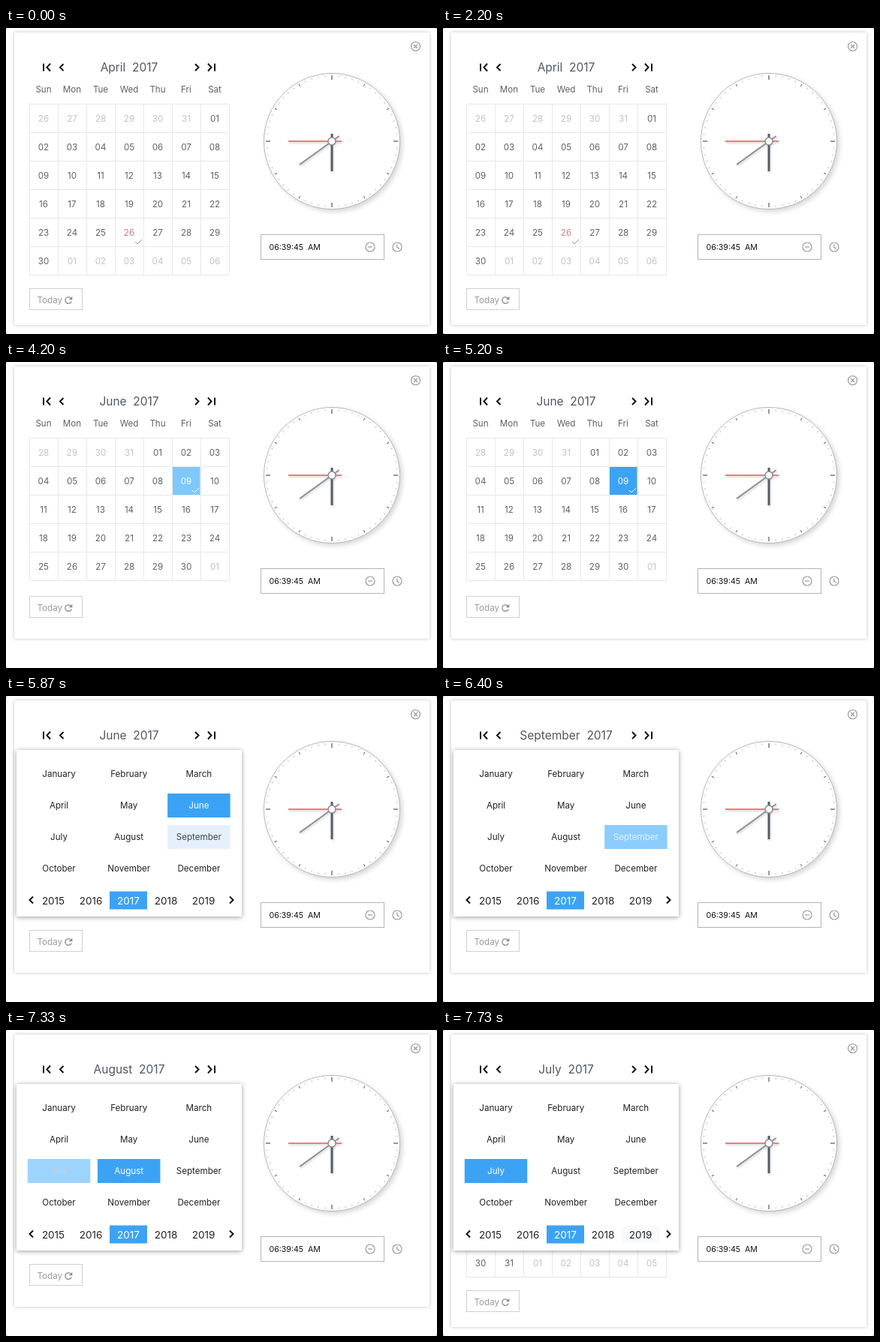
Write an HTML page that moves like this. It is 574 by 408 pixels and loops after 8000 ms.

```html
<!DOCTYPE html>
<html lang="en">
<head>
<meta charset="utf-8">
<title>Date and time picker</title>
<style>
html, body { margin: 0; width: 100%; height: 100%; overflow: hidden; background: #777; }
#stage { display: block; width: 574px; height: 408px; background: #fff; border-radius: 2px; }
text {
  font-family: Inter, "Open Sans", sans-serif; font-size: 11.6px; fill: currentColor;
  text-anchor: middle; dominant-baseline: central; white-space: pre;
}
.left { text-anchor: start; }
.icon { fill: none; stroke: #9a9a9a; stroke-width: 1.2; }
.nav { fill: none; stroke: #111; stroke-width: 2; }
.box { fill: #fff; stroke: #b4b4b4; }
.grid { fill: none; stroke: #e8e8e8; }
.tick { fill: none; stroke: #b98a8c; stroke-width: 1; }

#card { fill: #fff; height: 390px; filter: drop-shadow(0 0 2px rgba(0,0,0,.25)); }
#face { fill: #fff; stroke: #b5b5b5; filter: drop-shadow(3px 3px 3px rgba(0,0,0,.16)); }
#hands { filter: drop-shadow(1px 2px 1px rgba(0,0,0,.15)); }
#titles { color: #505860; }
#titles text { font-size: 15.5px; }
#weekdays { color: #606060; }
#today { color: #999; }
#pane { height: 229px; }
#popup { color: #222; transform-origin: 164px 72px; }
#sheet { fill: #fff; filter: drop-shadow(0 1px 3px rgba(0,0,0,.4)); }

.cell { fill: transparent; color: #5e6163; }
.out { color: #bfc2c4; }
.marked { color: #d4787c; }
.month, .year { fill: transparent; color: #222; }
.year text { font-size: 13.5px; }
.y2017 { fill: #3ca3f4; color: #fff; }

#card, #pane, #today, #track, #strip, #popup, #popup g, .hover, .pick, .check {
  animation: 8s ease-in-out infinite;
}
#card { animation-name: card; }
#pane { animation-name: pane; }
#today { animation-name: lift; }
#track { animation-name: track; }
#strip { animation-name: strip; animation-timing-function: step-end; }
#popup { animation-name: open; }
.hover { animation-name: pass; }
.pick { animation-name: pick; }
.check { animation-name: check; stroke: #fff; }
#popup .Jun { animation-name: june; }
#popup .Sep { animation-name: september; }
#popup .Aug { animation-name: august; }
#popup .Jul { animation-name: july; }
#popup .y2019 { animation-name: lastYear; }

@keyframes card {
  0%, 28.3%, 92.5%, 100% { height: 390px; }
  28.35%, 92.45% { height: 363px; }
}
@keyframes pane {
  0%, 28.3%, 92.5%, 100% { height: 229px; }
  28.35%, 92.45% { height: 191px; }
}
@keyframes lift {
  0%, 28.3%, 92.5%, 100% { transform: none; }
  28.35%, 92.45% { transform: translateY(-35px); }
}
@keyframes track {
  0%, 27.6% { transform: translateX(0); }
  31.3%, 35.6% { transform: translateX(-267px); }
  39%, 76.6% { transform: translateX(-534px); }
  76.7%, 87.5% { transform: translateX(-1335px); }
  87.6%, 92.5% { transform: translateX(-1068px); }
  95.7%, 100% { transform: translateX(-801px); }
}
@keyframes strip {
  0% { transform: translateY(0); }
  28.35% { transform: translateY(-24px); }
  36.6% { transform: translateY(-48px); }
  76.6% { transform: translateY(-120px); }
  87.5% { transform: translateY(-96px); }
  92.5%, 100% { transform: translateY(-72px); }
}
@keyframes open {
  0%, 68.3% { opacity: 0; transform: scaleY(.8); }
  71.2%, 100% { opacity: 1; transform: none; }
}
@keyframes pass {
  0%, 42.4%, 46.5%, 100% { fill: rgba(228,241,252,0); }
  43.5%, 44.8% { fill: rgb(228,241,252); }
}
@keyframes pick {
  0%, 44.8% { fill: rgba(228,241,252,0); color: #5e6163; }
  46.4%, 48.3% { fill: #e4f1fc; color: #5e6163; }
  50.8%, 56.5% { fill: #7dc8fc; color: #fff; }
  59%, 100% { fill: #3ca3f4; color: #fff; }
}
@keyframes check {
  0%, 48.3% { opacity: 0; }
  50%, 100% { opacity: 1; }
}
@keyframes june {
  0%, 76.5% { fill: #3ca3f4; color: #fff; }
  78.5%, 100% { fill: rgba(60,163,244,0); color: #222; }
}
@keyframes september {
  0%, 72% { fill: rgba(228,241,252,0); color: #222; }
  73.2%, 75.4% { fill: #e4f1fc; color: #444; }
  76.6%, 80% { fill: #8ccdfd; color: #e4f1fc; }
  81.5%, 87.4% { fill: #3ca3f4; color: #fff; }
  89.4%, 100% { fill: rgba(60,163,244,0); color: #222; }
}
@keyframes august {
  0%, 81.5% { fill: rgba(228,241,252,0); color: #222; }
  83%, 85.4% { fill: #e4f1fc; color: #444; }
  86.5%, 88.4% { fill: #8ccdfd; color: #cfe8fb; }
  89.6%, 92.4% { fill: #3ca3f4; color: #fff; }
  94.4%, 100% { fill: rgba(60,163,244,0); color: #222; }
}
@keyframes july {
  0%, 88.4% { fill: rgba(228,241,252,0); color: #222; }
  89.6%, 90.8% { fill: #e4f1fc; color: #444; }
  92%, 93.5% { fill: #8ccdfd; color: #e4f1fc; }
  95.5%, 100% { fill: #3ca3f4; color: #fff; }
}
@keyframes lastYear {
  0%, 95.7% { fill: rgba(248,250,253,0); }
  96.6%, 100% { fill: #f8fafd; }
}
</style>
</head>
<body>
<svg id="stage" viewBox="0 0 574 408">
  <rect id="card" x="11" y="6" width="553"/>

  <g class="icon">
    <circle cx="545.5" cy="24.5" r="6"/>
    <path d="M543 22l5 5m0-5l-5 5"/>
  </g>

  <path class="nav" d="M50 47.5v10M59 47.5l-4.5 5 4.5 5M76.5 48l-4.5 4.5 4.5 4.5M252 48l4.5 4.5-4.5 4.5M269 47.5l4.5 5-4.5 5M278 47.5v10"/>
  <svg id="titles" x="84" y="40" width="160" height="24"><g id="strip"></g></svg>
  <g id="weekdays"></g>
  <svg id="pane" x="31" y="101" width="267"><g id="track"></g></svg>

  <g id="today">
    <rect class="box" x="31.5" y="347.5" width="70" height="28" style="stroke:#d0d0d0"/>
    <text class="left" x="41.5" y="363">Today</text>
    <path class="icon" style="stroke-width:1.5" d="M86.4 360.2A4.3 4.3 0 1 0 87.2 364.4"/>
    <path fill="#8a8a8a" d="M88.3 357.7v4.6h-4.6z"/>
  </g>

  <g transform="translate(434 151)">
    <circle id="face" r="90.5"/>
    <g id="ticks"></g>
    <g id="hands" fill="none">
      <path d="M0-10V40" stroke="#555c63" stroke-width="3"/>
      <path d="M-58 0H13" stroke="#ee7b80" stroke-width="2"/>
      <path d="M0-12V53" stroke="#8c9196" stroke-width="2" transform="rotate(54)"/>
      <circle r="5" fill="#fff" stroke="#8c8c8c" stroke-width="1.5"/>
    </g>
  </g>

  <rect class="box" x="339.5" y="275.5" width="164" height="33"/>
  <text class="left" x="350.5" y="292.5" style="font-size:10.6px;color:#111">06:39:45  AM</text>
  <g class="icon">
    <circle cx="485" cy="292" r="6"/>
    <path d="M482 292h6"/>
    <circle cx="521" cy="292" r="6"/>
    <path d="M520.8 288.5v4l3 1.6"/>
  </g>

  <g id="popup">
    <rect id="sheet" x="14" y="72" width="300" height="222"/>
    <path class="nav" d="M36 267.5l-4.5 4.5 4.5 4.5M298 267.5l4.5 4.5-4.5 4.5"/>
  </g>
</svg>
<script>
const names = ['January', 'February', 'March', 'April', 'May', 'June', 'July',
  'August', 'September', 'October', 'November', 'December'];
const APRIL = 3, SEPTEMBER = 8, SIZE = 38;

const add = (id, markup) => document.getElementById(id).insertAdjacentHTML('beforeend', markup);
const label = (x, y, s) => `<text x="${x}" y="${y}">${s}</text>`;
const button = (cls, cx, cy, w, h, s) =>
  `<g class="${cls}"><rect x="${cx - w / 2}" y="${cy - h / 2}" width="${w}" height="${h}"/>${label(cx, cy, s)}</g>`;

function dayClass(date, month) {
  if (date.getMonth() !== month) return 'cell out';
  const key = `${month + 1}/${date.getDate()}`;
  return 'cell ' + ({ '4/26': 'marked', '6/2': 'hover', '6/9': 'pick' }[key] || '');
}

function calendar(month) {
  const lead = new Date(2017, month, 1).getDay();
  const rows = Math.ceil((lead + new Date(2017, month + 1, 0).getDate()) / 7);
  let cells = '', lines = '';
  for (let i = 0; i < rows * 7; i++) {
    const date = new Date(2017, month, i - lead + 1);
    const x = i % 7 * SIZE, y = Math.floor(i / 7) * SIZE;
    const cls = dayClass(date, month);
    cells += button(cls, x + 19, y + 19.5, 37, 37, String(date.getDate()).padStart(2, '0'));
    if (/marked|pick/.test(cls)) {
      cells += `<path class="tick ${cls.includes('pick') ? 'check' : ''}" d="M${x + 27} ${y + 32}l3 3 6-6"/>`;
    }
  }
  for (let c = 0; c < 8; c++) lines += `M${c * SIZE + .5} 0V${rows * SIZE + 1}`;
  for (let r = 0; r <= rows; r++) lines += `M0 ${r * SIZE + .5}H267`;
  return `<g transform="translate(${(month - APRIL) * 267})">${cells}<path class="grid" d="${lines}"/></g>`;
}

for (let m = APRIL; m <= SEPTEMBER; m++) {
  add('strip', label(80, 12.5 + (m - APRIL) * 24, names[m] + '  2017'));
  add('track', calendar(m));
}

['Sun', 'Mon', 'Tue', 'Wed', 'Thu', 'Fri', 'Sat']
  .forEach((d, i) => add('weekdays', label(50 + i * SIZE, 82, d)));

for (let i = 0; i < 60; i++) {
  const [end, color] = i % 15 === 0 ? [-82, '#333'] : i % 5 === 0 ? [-84.5, '#666'] : [-86, '#b5b5b5'];
  add('ticks', `<path d="M0-88V${end}" stroke="${color}" transform="rotate(${i * 6})"/>`);
}

names.forEach((name, i) => add('popup',
  button('month ' + name.slice(0, 3), 70.5 + i % 3 * 93.2, 104 + Math.floor(i / 3) * 42 - 0.5 + 0.5 + (i > 2 ? -1 : 0) + (i > 2 ? 1 : 0), 83.5, 32, name)));
for (let y = 2015; y < 2020; y++) {
  add('popup', button('year y' + y, 63 + (y - 2015) * 50, 272.5, 50, 24, y));
}
</script>
</body>
</html>
```
